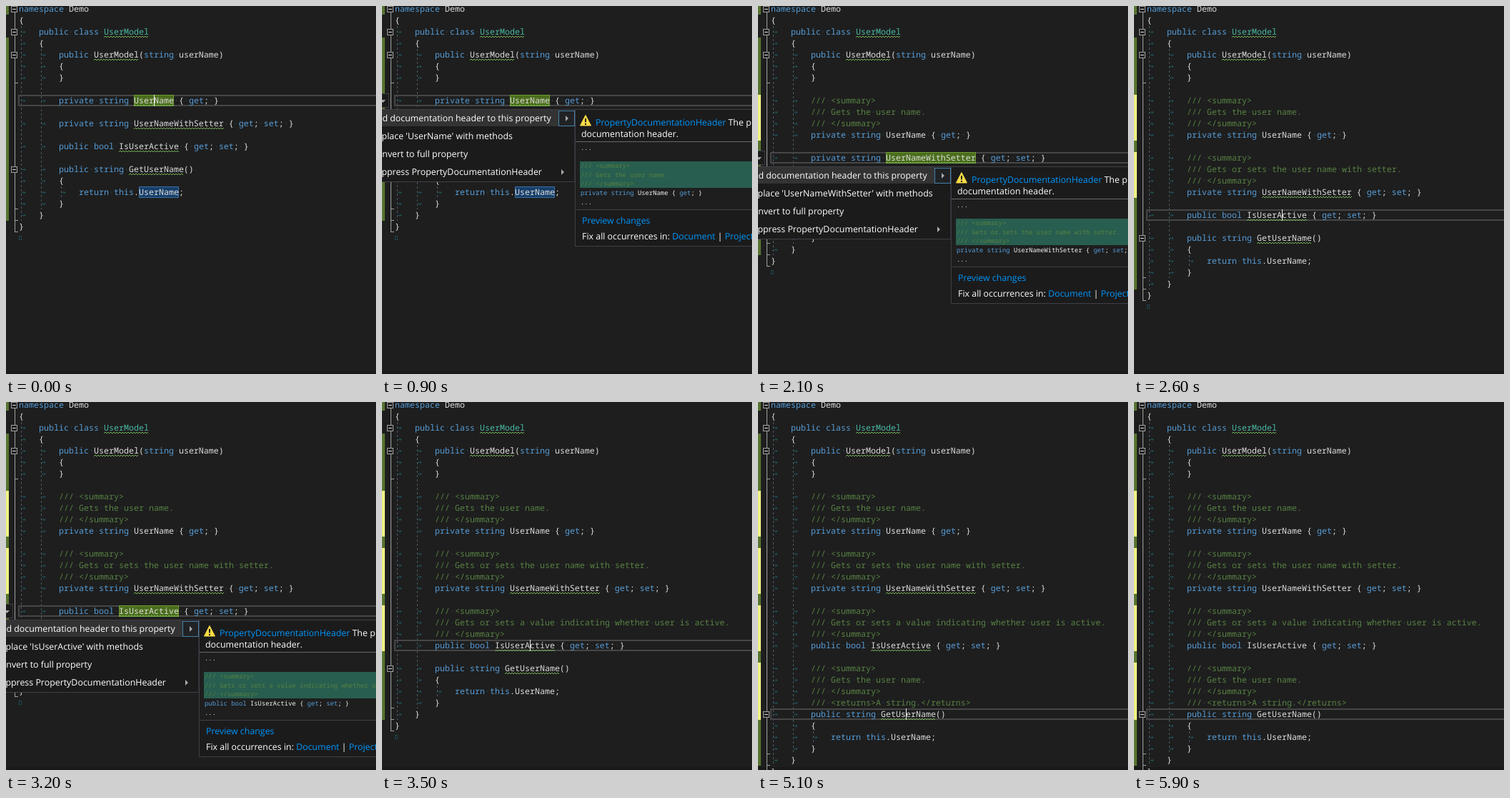
Recreate the animation shown at these times as an HTML page. Size 518 by 514 pixels, loop 6000 ms.

```html
<!DOCTYPE html>
<html lang="en">
<head>
<meta charset="utf-8">
<title>Documentation header demo</title>
<style>
  html, body { margin: 0; width: 518px; height: 514px; overflow: hidden; background: #1e1e1e; }
  svg { display: block; overflow: hidden; }
  text { white-space: pre; text-rendering: geometricPrecision; fill: #dcdcdc; }
  .code { font: 11.667px "Noto Sans Mono", monospace; }
  .peek { font: 500 8.89px "Noto Sans Mono", monospace; fill: #f1f1f1; }
  .ui { font: 12.4px "Open Sans", sans-serif; fill: #fff; }
</style>
</head>
<body>
<svg id="stage" width="518" height="514" viewBox="0 0 518 514"></svg>
<script>
const LOOP = 6000, STEP = 100, ROW = 16, COL = 7, LEFT = 18;
const BG = '#1e1e1e', PANEL = '#1b1b1c', EDGE = '#3f3f46';
const BLUE = '#569cd6', TEAL = '#48b8a2', COMMENT = '#578243', LINK = '#0097fb';

// Times in ms: caret arrives, symbol is marked, menu opens, preview opens, header added, warning cleared
const members = [
  { name: 'UserName', code: 'private string UserName { get; }', doc: 'Gets the user name.',
    move: 0, mark: 0, menu: 800, peek: 900, done: 1200, clean: 1800 },
  { name: 'UserNameWithSetter', code: 'private string UserNameWithSetter { get; set; }',
    doc: 'Gets or sets the user name with setter.',
    move: 1700, mark: 1900, menu: 1900, peek: 2000, done: 2300, clean: 5600 },
  { name: 'IsUserActive', code: 'public bool IsUserActive { get; set; }',
    doc: 'Gets or sets a value indicating whether user is active.',
    move: 2500, mark: 2900, menu: 3000, peek: 3100, done: 3400, clean: 5600 },
  { name: 'GetUserName', code: 'public string GetUserName()', doc: 'Gets the user name.', method: true,
    move: 4200, mark: 4600, menu: 4600, peek: 4700, done: 5000, clean: 5600 }
];

const esc = s => s.replace(/&/g, '&amp;').replace(/</g, '&lt;').replace(/>/g, '&gt;');
const span = (fill, s) => `<tspan fill="${fill}">${s}</tspan>`;
const text = (x, y, cls, s) => `<text x="${x}" y="${y}" class="${cls}">${s}</text>`;
const rect = (x, y, w, h, fill, stroke = 'none', sw = 1) =>
  `<rect x="${x}" y="${y}" width="${w}" height="${h}" fill="${fill}" stroke="${stroke}" stroke-width="${sw}"/>`;
const path = (d, stroke, extra = '') => `<path d="${d}" fill="none" stroke="${stroke}" ${extra}/>`;
const mid = row => 4 + ROW * row;

const TOKENS = /\b(namespace|public|private|class|string|bool|get|set|return|this)\b|(?<=class )UserModel| /g;
const dot = span('#2a474e', '·');

function paint(s, dots = true) {
  const space = dots ? dot : ' ';
  if (s.startsWith('///')) return span(COMMENT, esc(s).replace(/ /g, space));
  return s.replace(TOKENS, (m, key) => m === ' ' ? space : span(key ? BLUE : TEAL, m));
}

function docLines(m) {
  const lines = ['/// <summary>', '/// ' + m.doc, '/// </summary>'];
  if (m.method) lines.push('/// <returns>A string.</returns>');
  return lines;
}

function buildLines(t) {
  const lines = [];
  const add = (tabs, s, more) => lines.push({ tabs, s, ...more });
  add(0, 'namespace Demo', { fold: true });
  add(0, '{');
  add(1, 'public class UserModel', { fold: true, warn: 'UserModel' });
  add(1, '{');
  add(2, 'public UserModel(string userName)', { fold: true, warn: 'UserModel' });
  add(2, '{');
  add(2, '}', { end: true });
  add(0, '');
  members.forEach((m, i) => {
    const fresh = t >= m.done;
    if (fresh) docLines(m).forEach(s => add(2, s, { fresh }));
    add(2, m.code, { m, fresh, fold: m.method, warn: t < m.clean && m.name });
    if (i < 3) add(0, '');
  });
  add(2, '{');
  add(3, 'return this.UserName;', { ref: true });
  add(2, '}', { end: true });
  add(1, '}', { end: true });
  add(0, '}', { end: true });
  return lines;
}

function squiggle(x, y, w) {
  let d = `M${x} ${y + 1}`;
  for (let i = 2; i <= w; i += 2) d += `L${x + i} ${y + (i % 4 ? -1 : 1)}`;
  return path(d, '#78b457');
}

const place = (line, word) => LEFT + COL * (4 * line.tabs + line.s.lastIndexOf(word));

function guides(n) {
  const dash = (x, a, b) => path(`M${x} ${a}V${b}`, '#4b5e66', 'stroke-dasharray="3 3"');
  return dash(21.5, mid(1) + 8, mid(n - 1) - 8) +
         dash(49.5, mid(3) + 8, mid(n - 2) - 8) +
         dash(77.5, mid(n - 4) - 8, mid(n - 4) + 8);
}

function margin(lines) {
  const n = lines.length, grey = '#a0a0a0';
  let out = path(`M12.5 4V${mid(n - 1) + 7}`, grey);
  lines.forEach((l, i) => {
    const y = mid(i);
    if (i === 0 || (i > 2 && i < n - 1)) out += rect(0, y - 8, 4, ROW, l.fresh ? '#eff284' : '#577430');
    if (l.end) out += path(`M12 ${y + 7.5}h5`, grey);
    if (l.fold) out += rect(7.5, y - 3.5, 8, 8, BG, grey) + path(`M9 ${y + .5}h5`, '#dcdcdc');
  });
  return out;
}

function codeLine(l, y) {
  const x = LEFT + 4 * COL * l.tabs;
  let out = text(x, y + 4, 'code', paint(l.s));
  for (let i = 0; i < l.tabs; i++)
    out += path(`M${22 + 28 * i} ${y + .5}h5m-2 -2l2 2l-2 2`, '#22505a');
  if (l.warn) out += squiggle(place(l, l.warn), y + 7, l.warn.length * COL);
  return out;
}

const kindOf = m => m.method ? 'method' : 'property';
const ruleOf = m => (m.method ? 'Method' : 'Property') + 'DocumentationHeader';

function menu(m, y) {
  const rows = [
    `Add documentation header to this ${kindOf(m)}`,
    `Replace '${m.name}' with ${m.method ? 'property' : 'methods'}`,
    m.method ? 'Use expression body' : 'Convert to full property',
    `Suppress ${ruleOf(m)}`
  ];
  const arrow = (x, dy) => `<path d="M${x} ${y + dy - 4}l4 4l-4 4z" fill="#a8a8a8"/>`;
  return rect(-1, y + 12.5, 271, 101, PANEL, EDGE) +
    rect(0, y + 13, 247, 23, '#333334') +
    rect(247.5, y + 14.5, 22, 21, '#202225', '#4780a8') +
    arrow(257, 25) + arrow(251, 100) +
    rows.map((s, i) => text(-15, y + 29 + 25 * i, 'ui', s)).join('');
}

function preview(m, y) {
  const docs = docLines(m);
  const grow = (docs.length - 3) * 12.5;
  const row = (s, i) => text(278, y + 94 + 12.5 * i, 'peek', paint(s, false));
  return rect(270.5, y + 12.5, 260, 191 + grow, PANEL, EDGE) +
    `<path d="M285 ${y + 20.5}l7.5 14.5h-15z" fill="#fbdc45" stroke="#fbdc45" stroke-linejoin="round"/>` +
    path(`M285 ${y + 25}v5.5m0 1.5v2`, PANEL, 'stroke-width="2"') +
    text(299, y + 34.5, 'ui', span(LINK, ruleOf(m)) + ` The ${kindOf(m)} must have a`) +
    text(279, y + 50.5, 'ui', 'documentation header.') +
    rect(271, y + 58, 250, 94 + grow, BG) +
    path(`M271 ${y + 57.5}h250`, '#68686c') +
    path(`M271 ${y + 152.5 + grow}h250`, EDGE) +
    text(278, y + 69, 'peek', '...') +
    rect(277, y + 85, 250, 37 + grow, '#285e4f') +
    [...docs, m.code].map(row).join('') +
    text(278, y + 145 + grow, 'peek', '...') +
    text(280, y + 171.5 + grow, 'ui', span(LINK, 'Preview changes')) +
    text(280, y + 193.5 + grow, 'ui', 'Fix all occurrences in: ' + span(LINK, 'Document') + ' | ' + span(LINK, 'Project'));
}

function render(t) {
  const lines = buildLines(t), n = lines.length;
  const m = members.filter(o => t >= o.move).pop();
  const row = lines.findIndex(l => l.m === m), y = mid(row);
  const marked = t >= m.mark && t < m.done, open = t >= m.menu && t < m.done;
  const since = t - (t >= m.done ? m.done : m.move);

  let out = rect(0, 510, 518, 4, '#19191a') + guides(n) + margin(lines);
  out += rect(18, y - 7, 520, 14, 'none', '#464646', 2);
  if (marked) {
    out += rect(place(lines[row], m.name) + .5, y - 7.5, m.name.length * COL - 1, 15, '#4a6d1c', '#6f9a35');
    if (m === members[0]) {
      const i = lines.findIndex(l => l.ref);
      out += rect(place(lines[i], m.name) + .5, mid(i) - 7.5, m.name.length * COL - 1, 15, '#173f69', '#3a6ea5');
    }
  }
  lines.forEach((l, i) => out += codeLine(l, mid(i)));
  out += rect(18.5, mid(n) - 2.5, 3, 5, 'none', '#1f474d');

  if (!open && since % 1000 < 500) out += path(`M207.5 ${y - 8}v16`, '#f0f0f0');
  if (open) {
    out += rect(-1, y - 9.5, 10.5, 19, PANEL, EDGE) +
      `<path d="M-2 ${y - 1}h7l-3.5 4z" fill="#a8a8a8"/>` + menu(m, y);
    if (t >= m.peek) out += preview(m, y);
  }
  return out;
}

const stage = document.getElementById('stage'), start = performance.now();
let shown = -1;

function tick() {
  const t = Math.floor((performance.now() - start) % LOOP / STEP) * STEP;
  if (t !== shown) stage.innerHTML = render(shown = t);
  requestAnimationFrame(tick);
}
tick();
</script>
</body>
</html>
```
